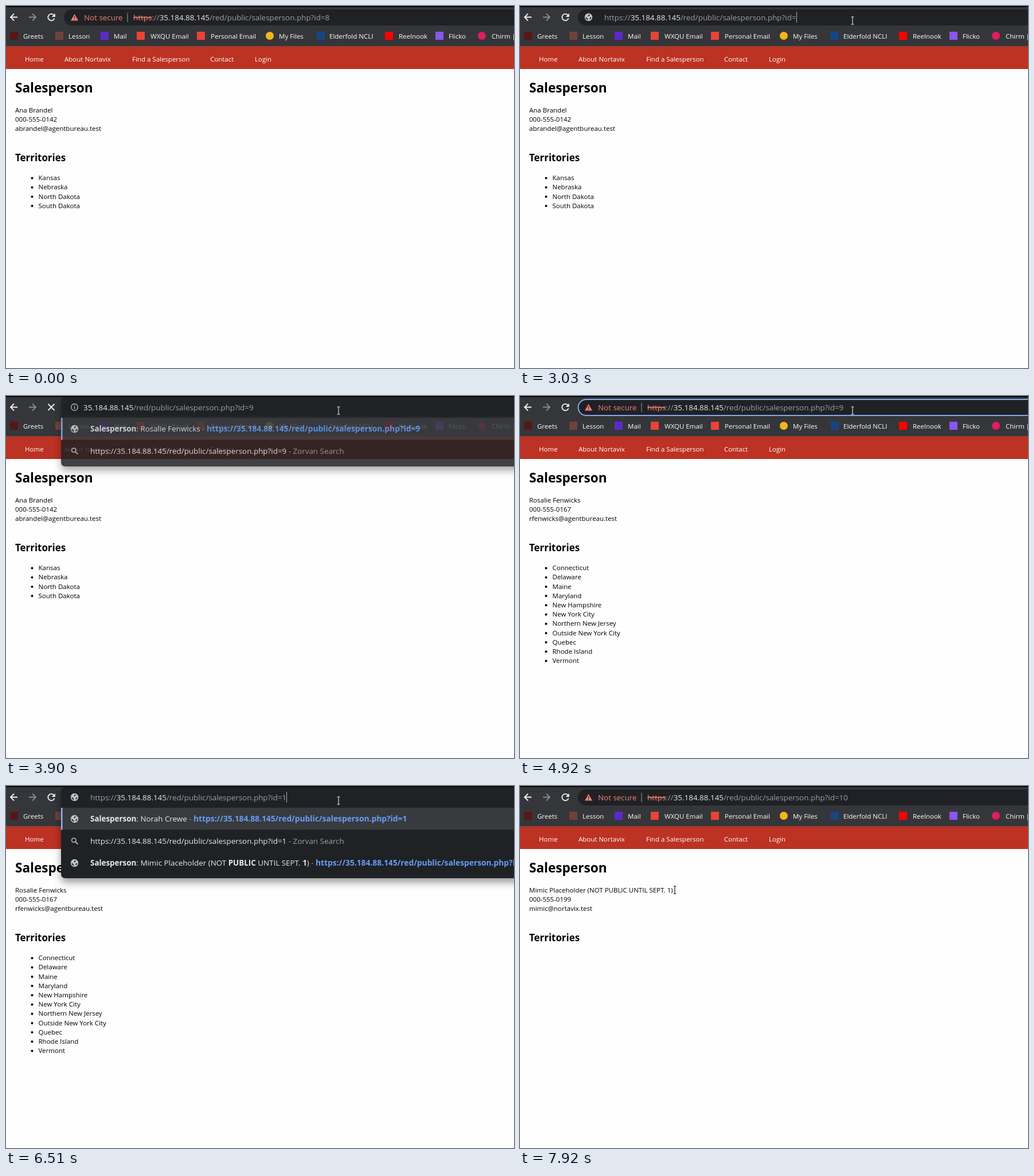
An HTML page that plays this animation: 886 by 632 pixels, repeating every 7990 ms.

```html
<!DOCTYPE html>
<html lang="en">
<head>
<meta charset="utf-8">
<title>Salesperson</title>
<style>
  html, body { margin: 0; width: 100%; height: 100%; overflow: hidden; background: #fefefe; }
  svg { display: block; font: 11.5px "Open Sans", "Noto Sans", sans-serif; }
  .bar { font-size: 13.4px; }
  .white { fill: #e8eaed; }
  .grey { fill: #9aa0a6; }
  .red { fill: #ee8277; }
  .blue { fill: #669df6; font-size: 13.8px; }
  .blue, .bold { font-weight: 700; }
  .struck { text-decoration: line-through; }
  .line { fill: none; stroke-width: 1.8; }
  .drop { filter: drop-shadow(0 7px 7px rgba(0, 0, 0, .4)); }
</style>
</head>
<body>
<svg id="stage" width="886" height="632" viewBox="0 0 886 632"></svg>
<script>
const LOOP = 7990, STEP = 70, ROW = 38.5;
const stage = document.getElementById('stage');
const IP = '35.184.88.145', PATH = '/red/public/salesperson.php?id=';
const HIDDEN = 'Mimic Placeholder';

const people = {
  8: { name: 'Ana Brandel', phone: '000-555-0142', mail: 'abrandel@agentbureau.test',
    areas: ['Kansas', 'Nebraska', 'North Dakota', 'South Dakota'] },
  9: { name: 'Rosalie Fenwicks', phone: '000-555-0167', mail: 'rfenwicks@agentbureau.test',
    areas: ['Connecticut', 'Delaware', 'Maine', 'Maryland', 'New Hampshire', 'New York City',
      'Northern New Jersey', 'Outside New York City', 'Quebec', 'Rhode Island', 'Vermont'] },
  10: { name: HIDDEN + ' (NOT PUBLIC UNTIL SEPT. 1)', phone: '000-555-0199',
    mail: 'mimic@nortavix.test', areas: [] }
};

// label, label x, icon x, icon colour, round icon
const bookmarks = [
  ['Greets', 30, 14, '#551818'], ['Lesson', 109, 93, '#70423b'], ['Mail', 188, 172, '#5b2bc9'],
  ['WXQU Email', 252, 235, '#ea4335'], ['Personal Email', 357, 340, '#ea4335'],
  ['My Files', 476, 460, '#f3b51b', 1], ['Elderfold NCLI', 564, 549, '#174583'],
  ['Reelnook', 685, 668, '#f00'], ['Flicko', 772, 756, '#8c55f5'],
  ['Chirm | a', 847, 830, '#e01e5a', 1]
];
const menu = [['Home', 33], ['About Nortavix', 102], ['Find a Salesperson', 220],
  ['Contact', 356], ['Login', 434]];

// Each step overrides part of the state from its time onward.
const steps = [
  [0, { mode: 'view', id: '8', who: 8, ring: 0, sel: 0, caret: 0, list: '', fade: 1, busy: 0 }],
  [1370, { ring: 1 }],
  [1440, { sel: 1 }],
  [2300, { sel: 0, caret: 1 }],
  [2830, { caret: 0 }],
  [3030, { mode: 'edit', id: '', ring: 0, caret: 1 }],
  [3100, { list: 'all', fade: .8 }],
  [3170, { fade: 1 }],
  [3500, { id: '9', list: 'nine' }],
  [3900, { mode: 'load', caret: 0, fade: .85, busy: 1 }],
  [3970, { list: '', fade: 1 }],
  [4170, { mode: 'view' }],
  [4240, { who: 9 }],
  [4310, { busy: 0 }],
  [4920, { ring: 1 }],
  [4990, { sel: 1 }],
  [5450, { sel: 0, caret: 1 }],
  [5980, { caret: 0 }],
  [6120, { mode: 'edit', id: '', ring: 0, caret: 1 }],
  [6180, { list: 'all' }],
  [6510, { id: '1', list: 'one' }],
  [6780, { id: '10', list: 'ten' }],
  [7040, { mode: 'load', caret: 0, fade: .85, busy: 1 }],
  [7110, { list: '', fade: 1 }],
  [7180, { mode: 'view', who: 10 }],
  [7250, { busy: 0 }]
];

// Pointer keys: time, x, y
const track = [[190, 647, 356], [330, 553, 201], [460, 553, 201], [1090, 590, 78],
  [1300, 580, 25], [7640, 580, 25], [7920, 270, 181], [LOOP, 270, 181]];

const text = (x, y, body, cls = '', extra = '') =>
  `<text x="${x}" y="${y}" class="${cls}" ${extra}>${body}</text>`;
const span = (cls, body) => `<tspan class="${cls}">${body}</tspan>`;
const rect = (x, y, w, h, fill, extra = '') =>
  `<rect x="${x}" y="${y}" width="${w}" height="${h}" fill="${fill}" ${extra}/>`;
const line = (d, color, extra = '') =>
  `<path d="${d}" class="line" stroke="${color}" ${extra}/>`;

const globe = y => `<circle cx="119.5" cy="${y}" r="6.7" fill="#c4c7cb"/>
  <path d="M114.3 ${y - 1}l4 3.5v3q-4-2-4-6.5zM119.5 ${y - 4.5}h2.5l-1 2.5-3 1zM121.5 ${y + 1}l3-1.5-1 3.5-2 1.5z" fill="#303134"/>`;
const lens = y => `<circle cx="118.3" cy="${y - 1.4}" r="3.7" class="line" stroke="#bdc1c6" style="stroke-width:1.5"/>`
  + line(`M121 ${y + 1.3}l4.3 4.3`, '#bdc1c6');

const link = id => `https://${IP}${PATH}${id}`;
const entry = (name, id) => [globe, span('bold', 'Salesperson') + ': ' + name
  + span('grey', ' - ') + span('blue', link(id))];
const search = id => [lens, link(id) + span('grey', ' - Zorvan Search')];
const secret = `${HIDDEN} (NOT ${span('bold', 'PUBLIC')} UNTIL SEPT. `;
const nine = entry(people[9].name, 9), one = entry('Norah Crewe', 1);
const ten = entry(secret + span('bold', '1') + ')', 10);
const lists = {
  all: [[globe, span('blue', link(''))], search(''), entry(people[8].name, 8), nine, one, ten],
  nine: [nine, search(9)],
  one: [one, search(1), ten],
  ten: [ten, search(10)]
};

function page(p) {
  const areas = p.areas.map((area, i) => {
    const y = 300 + i * 16.2;
    return `<circle cx="45.5" cy="${y + .5}" r="2"/>` + text(56.5, y + 4.2, area);
  });
  return rect(0, 70, 886, 40, '#bc3223') + rect(0, 70, 886, 1, '#7b4a45')
    + menu.map(([label, x]) => text(x, 97, label, '', 'fill="#fff"')).join('')
    + text(16, 150.5, 'Salesperson', 'bold', 'font-size="22.6"')
    + text(16, 186, p.name) + text(16, 202.2, p.phone) + text(16, 218.4, p.mail)
    + text(16, 271, 'Territories', 'bold', 'font-size="16.9"') + areas.join('');
}

function toolbar(s) {
  const arrow = (x, dir, color) =>
    line(`M${x - 6 * dir} 19.5H${x + 6 * dir}M${x} 13.5L${x + 6 * dir} 19.5L${x} 25.5`, color);
  const icons = bookmarks.map(([label, x, cx, color, round]) =>
    rect(cx - 7, 45, 14, 14, color, round ? 'rx="7"' : '') + text(x, 56.7, label, '', 'fill="#fff"'));
  const reload = line('M84 16.5A5.8 5.8 0 1 0 84.6 21.5', '#f1f3f4')
    + '<path d="M85.8 13v6h-6z" fill="#f1f3f4"/>';
  return rect(0, 0, 886, 70, '#35363a') + rect(0, 0, 886, 2, '#090909')
    + arrow(14, -1, '#f1f3f4') + arrow(46, 1, '#8a8c90')
    + (s.busy ? line('M73.5 14l11 11M84.5 14l-11 11', '#f1f3f4') : reload)
    + rect(101, 6, 820, 28, '#202124', 'rx="14"')
    + (s.ring ? rect(101.5, 6, 820, 28, 'none', 'rx="14" stroke="#86aaf0" stroke-width="2"') : '')
    + icons.join('');
}

function popup(s) {
  if (!s.list) return '';
  const rows = lists[s.list], bottom = Math.floor(46 + ROW * rows.length);
  const body = rows.map(([icon, label], i) =>
    icon(57.5 + ROW * i) + text(147, 62 + ROW * i, label, 'bar white'));
  return `<g opacity="${s.fade}"><path class="drop" fill="#202124"
    d="M104 2H900V${bottom}H104q-8 0-8-8V10q0-8 8-8z"/>`
    + rect(96, 38, 800, ROW, '#393a3d') + rect(96, 38, 2.5, ROW, '#8ab4f8') + body.join('') + '</g>';
}

function address(s) {
  const tail = span('white', IP) + span('grey', PATH + s.id);
  const put = (x, body) => text(x, 25, body, 'bar', 'id="url"');
  const marks = '<rect id="caret" y="10" width="1" height="19" fill="#a9adb2" visibility="hidden"/>';
  if (s.mode === 'edit') return globe(19.5) + put(147, span('grey', 'https://') + tail) + marks;
  if (s.mode === 'load') {
    return '<circle cx="119.5" cy="19.5" r="5.8" class="line" stroke="#bdc1c6" style="stroke-width:1.3"/>'
      + line('M119.5 18.5v4.2M119.5 15.8v1.5', '#bdc1c6', 'style="stroke-width:1.4"') + put(135, tail) + marks;
  }
  const whole = s.sel
    ? span('white', span('struck', 'https') + '://' + IP + PATH + s.id)
    : span('red struck', 'https') + span('grey', '://') + tail;
  return '<path d="M119.5 14l6.5 11.5h-13z" fill="#ee8277"/>'
    + line('M119.5 17.8v3.6M119.5 22.6v1.4', '#202124', 'style="stroke-width:1.3"')
    + text(136, 25, 'Not secure', 'bar red') + rect(211.5, 12, 1, 16, '#9aa0a6')
    + '<rect id="mark" x="222" y="9" height="22" fill="#4b6690" visibility="hidden"/>'
    + put(222, whole) + marks;
}

function pointer(t) {
  const i = track.findIndex((k, n) => n && t < k[0]) - 1;
  if (t < track[0][0] || i < 0) return '';
  const [t0, x0, y0] = track[i], [t1, x1, y1] = track[i + 1];
  const f = Math.floor((t - t0) / STEP) * STEP / (t1 - t0);
  const x = x0 + (x1 - x0) * f, y = y0 + (y1 - y0) * f;
  if (y < 34 || t >= 7920) {
    return line(`M${x - 2.5} ${y - 6}h2l.5.5.5-.5h2M${x} ${y - 5.5}v12M${x - 2.5} ${y + 7}h2l.5-.5.5.5h2`,
      y < 34 ? '#e8eaed' : '#111', 'style="stroke-width:1.1"');
  }
  return `<path d="M${x} ${y}v15l3.5-3.3 2.3 5.2 2.3-1-2.3-5.2h4.9z" fill="#fff" stroke="#111"/>`;
}

function render(s, cursor) {
  stage.innerHTML = page(people[s.who]) + toolbar(s) + popup(s) + address(s) + cursor;
  const url = stage.querySelector('#url');
  const width = url.getComputedTextLength();
  if (s.caret) {
    const caret = stage.querySelector('#caret');
    caret.setAttribute('x', Math.round(+url.getAttribute('x') + width));
    caret.setAttribute('visibility', 'visible');
  }
  if (s.sel) {
    const mark = stage.querySelector('#mark');
    mark.setAttribute('width', width);
    mark.setAttribute('visibility', 'visible');
  }
}

let shown = '';
const start = performance.now();
function tick() {
  const t = (performance.now() - start) % LOOP;
  const state = Object.assign({}, ...steps.filter(([at]) => at <= t).map(([, part]) => part));
  const cursor = pointer(t), key = JSON.stringify(state) + cursor;
  if (key !== shown) render(state, cursor);
  shown = key;
  requestAnimationFrame(tick);
}
tick();
</script>
</body>
</html>
```
